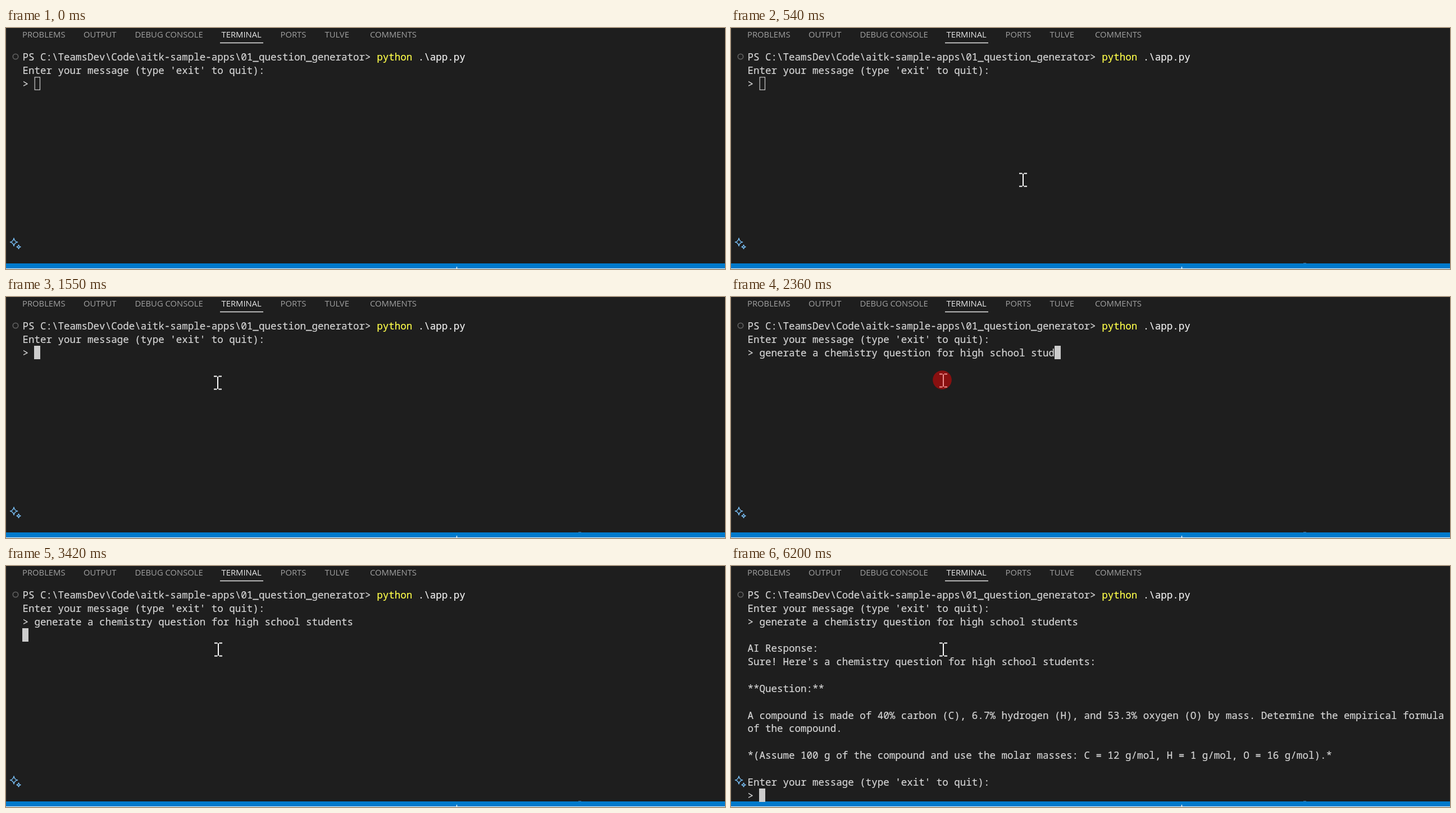
An HTML page for the animation above (8 s loop, 1280 by 430 pixels).

```html
<!DOCTYPE html>
<html lang="en">
<head>
<meta charset="utf-8">
<title>Terminal</title>
<style>
  html, body { margin: 0; width: 100%; height: 100%; overflow: hidden; background: #1e1e1e; }
  svg { display: block; }
  text { white-space: pre; fill: currentColor; stroke: currentColor; }
  #tabs { font: 14.8px "Open Sans", "Noto Sans", sans-serif; color: #a0a0a0; stroke-width: 0; }
  #lines { font: 17.52px "Noto Sans Mono", "DejaVu Sans Mono", monospace; color: #d6d6d6; stroke-width: .2; font-variant-ligatures: none; }
</style>
</head>
<body>
<svg width="1280" height="430" viewBox="0 0 1280 430">
  <rect width="1280" height="430" fill="#1e1e1e"/>
  <path d="M.5 0V420" stroke="#2b2b2b"/>
  <g id="tabs"></g>
  <path d="M381 26.5H458" stroke="#e7e7e7" stroke-width="1.3"/>
  <circle cx="17" cy="51" r="4.7" fill="none" stroke="#5c5c5c" stroke-width="1.8"/>
  <g stroke="#75b9ee" stroke-width="1.5" stroke-linejoin="round" fill="none">
    <path d="M14 375Q15 381 20.5 382Q15 383 14 389Q13 383 7.5 382Q13 381 14 375Z"/>
    <path d="M22.5 387Q23 390 26 390.5Q23 391 22.5 394Q22 391 19 390.5Q22 390 22.5 387Z"/>
  </g>
  <rect y="420" width="1280" height="9" fill="#007acc"/>
  <rect y="429" width="1280" height="1" fill="#fff"/>
  <path d="M802.5 426V430" stroke="#fff" stroke-width="1.4"/>
  <path id="speck" d="M1019 419.5H1024" stroke="#4b6f88"/>
  <g id="lines"></g>
  <rect id="block" width="11" height="24" fill="#cccccc"/>
  <rect id="hollow" x="51.2" y="87.8" width="9.3" height="22.5" fill="none" stroke="#cccccc" stroke-width="1.2"/>
  <g id="mouse">
    <circle id="click" cx="-2" cy="-1" r="16.8" fill="#881010"/>
    <path id="beam" d="M-7 -11.5H-1.5M1.5 -11.5H7M0 -11V11M-7 11.5H-1.5M1.5 11.5H7" fill="none" stroke-width="2"/>
  </g>
</svg>
<script>
const LOOP = 8000, LEFT = 29.5, CHAR = 10.512, ROW = 23.82;
const $ = id => document.getElementById(id);
const show = (id, on) => $(id).setAttribute('visibility', on ? 'visible' : 'hidden');

function addText(parent, x, y, content, color = '') {
  const el = document.createElementNS('http://www.w3.org/2000/svg', 'text');
  el.setAttribute('x', x);
  el.setAttribute('y', y);
  el.style.color = color;
  el.textContent = content;
  $(parent).append(el);
  return el;
}
const addLine = (row, content, col = 0, color) =>
  addText('lines', LEFT + col * CHAR, 58.2 + row * ROW, content, color);

[['PROBLEMS', 29], ['OUTPUT', 138], ['DEBUG CONSOLE', 229.5], ['TERMINAL', 383.5],
 ['PORTS', 488.5], ['TULVE', 567.5], ['COMMENTS', 648]].forEach(([name, x]) =>
  addText('tabs', x, 17.4, name, name === 'TERMINAL' ? '#e7e7e7' : ''));

const request = 'generate a chemistry question for high school students';
const ask = "Enter your message (type 'exit' to quit):";
addLine(0, 'PS C:\\TeamsDev\\Code\\aitk-sample-apps\\01_question_generator> ');
addLine(0, 'python', 60, '#ffff4a');
addLine(0, '.\\app.py', 67, '#f0f0f0');
addLine(1, ask);
const input = addLine(2, '> ');
const heading = addLine(4, 'AI Response:');
const answer = [
  [5, "Sure! Here's a chemistry question for high school students:"],
  [7, '**Question:**'],
  [9, 'A compound is made of 40% carbon (C), 6.7% hydrogen (H), and 53.3% oxygen (O) by mass. Determine the empirical formula'],
  [10, 'of the compound.'],
  [12, '*(Assume 100 g of the compound and use the molar masses: C = 12 g/mol, H = 1 g/mol, O = 16 g/mol).*'],
  [14, ask],
  [15, '> ']
].map(([row, content]) => addLine(row, content));

const glide = [[1168, 436], [1021, 428], [872, 396], [738, 352], [618, 309], [520, 271],
               [456, 239], [415, 214], [393, 197], [382, 186], [377, 180], [375, 176.5]];
const nudge = [[374, 171], [376, 161], [377, 153], [378, 149]];
const step = (points, start, end, t) => points[
  Math.min(points.length - 1, Math.floor((t - start) / (end - start) * (points.length - 1) + 0.05))];

function pointer(t) {
  if (t < 1010) return step(glide, 200, 930, t);
  if (t < 1410) return [373, 174.5];
  return step(nudge, 1410, 1610, t);
}

function cursor(t) {
  if (t < 2360) return [2, 2];
  if (t < 2420) return [52, 2];
  if (t < 3420) return [56, 2];
  if (t < 6130) return [0, 3];
  return t < 6200 ? [12, 4] : [2, 15];
}

function draw(t) {
  const typed = t < 2360 ? 0 : t < 2420 ? 50 : request.length;
  input.textContent = '> ' + request.slice(0, typed);
  heading.style.display = t < 6130 ? 'none' : '';
  answer.forEach(el => el.style.display = t < 6200 ? 'none' : '');

  const focused = t >= 1270;
  show('hollow', !focused);
  show('block', focused);
  const [col, row] = cursor(t);
  $('block').setAttribute('x', Math.round(LEFT - 0.3 + col * CHAR));
  $('block').setAttribute('y', Math.round(39.4 + row * ROW));

  const moved = t >= 200;
  const pressed = (t >= 1210 && t < 1270) || (t >= 2360 && t < 2500);
  show('beam', moved);
  show('click', pressed);
  show('speck', t >= 270);
  $('beam').setAttribute('stroke', pressed ? '#ee8c8c' : '#ffffff');
  if (moved) $('mouse').setAttribute('transform', `translate(${pointer(t)})`);
}

const begin = performance.now();
function tick() {
  draw((performance.now() - begin) % LOOP);
  requestAnimationFrame(tick);
}
tick();
</script>
</body>
</html>
```
